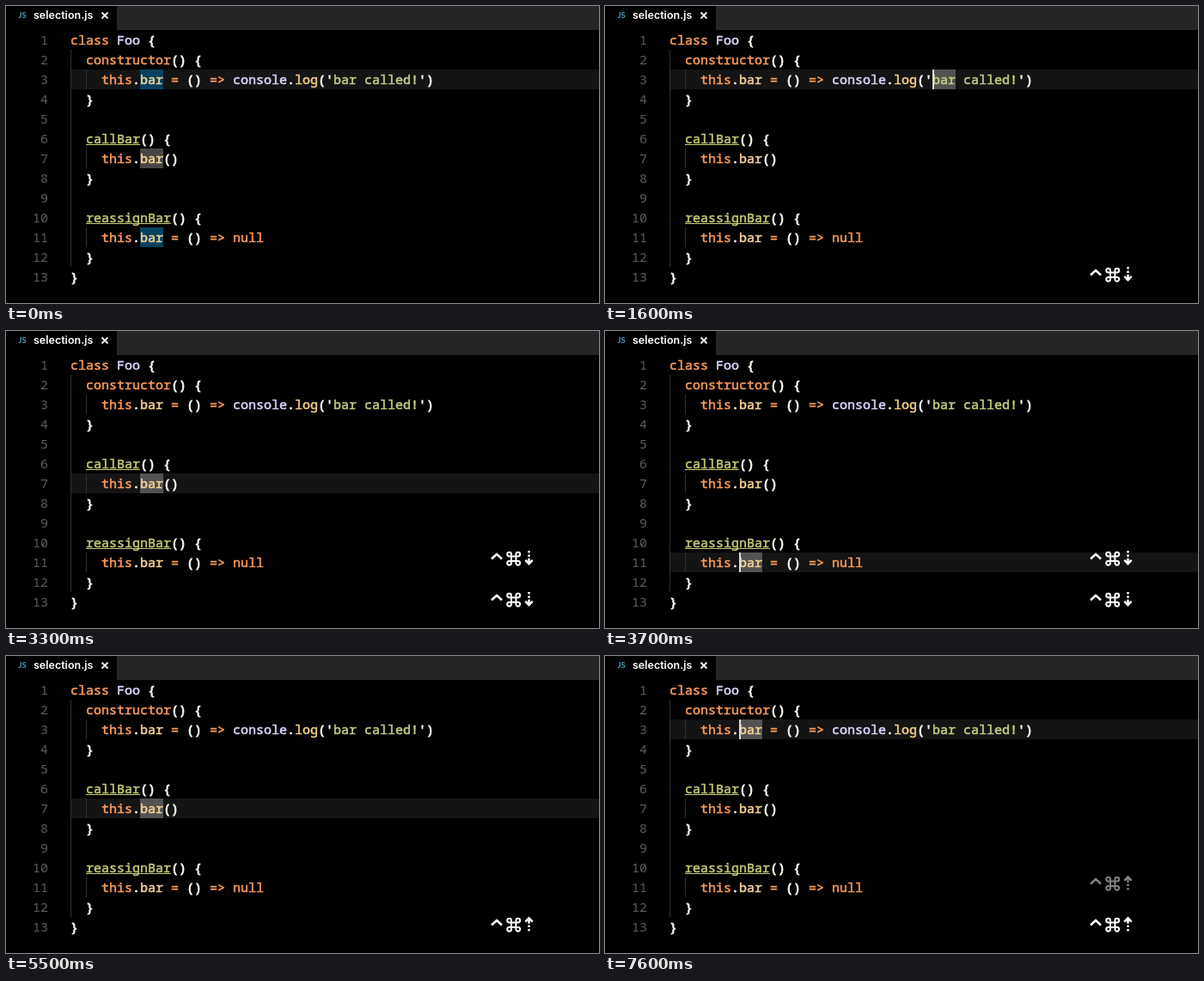
Recreate the animation shown at these times as an HTML page. Size 690 px wide and 346 px high, loop 7700 ms.

```html
<!DOCTYPE html>
<html lang="en">
<head>
<meta charset="utf-8">
<title>Selecting occurrences</title>
<style>
  html, body { margin: 0; width: 100%; height: 100%; overflow: hidden; background: #000; }
  svg { display: block; width: 690px; height: 346px; }
  .code text { font: 500 15px "Noto Sans Mono", "DejaVu Sans Mono", monospace; white-space: pre; stroke-width: .55; }
  .code .p { stroke-width: .8; }
  .tab { font: 600 12.5px Inter, Roboto, sans-serif; fill: #fff; }
  .icon { font: 700 9.5px Lato, "Open Sans", sans-serif; fill: #4d9cbd; }
  .num { fill: #5c5c5c; text-anchor: end; }
  .key { fill: none; stroke: #fff; stroke-width: 2; }
</style>
</head>
<body>
<svg id="stage" viewBox="0 0 690 346">
  <rect width="690" height="346" fill="#000"/>
  <rect x="129" width="561" height="28" fill="#252526"/>
  <text class="icon" x="14.5" y="14">JS</text>
  <text class="tab" x="32" y="15">selection.js</text>
  <path d="M111.5 7.5l7 7m0-7l-7 7" stroke="#eee" stroke-width="1.8"/>
  <rect id="row" x="75" width="615" height="23" fill="#141414"/>
  <g id="marks"></g>
  <rect id="selection" width="27" height="23" fill="#525252"/>
  <g id="guides" fill="#303030"></g>
  <g id="code" class="code"></g>
  <rect id="caret" width="2" height="23" fill="#dedede"/>
  <g id="keys"></g>
</svg>
<script>
const LOOP = 7700, STEP = 100, COL = 9, ROW = 23, LEFT = 75, TOP = 28;
const LINGER = 1800, FADE = 200, KEY_GAP = 48;

// k keyword, n name, p punctuation, f call, m method, s string, v property
const COLORS = {
  k: '#f99a58', n: '#d9d6fc', p: '#fafaf5', f: '#f5cf86',
  m: '#c3c974', s: '#c3ce84', v: '#f7d498'
};
const LINES = [
  [0, 'k:class ', 'n:Foo ', 'p:{'],
  [2, 'k:constructor', 'p:() {'],
  [4, 'k:this', 'p:.', 'v:bar', 'k: = ', 'p:() ', 'k:=> ', 'n:console', 'p:.', 'f:log', "p:('", 's:bar called!', "p:')"],
  [2, 'p:}'],
  [0],
  [2, 'm:callBar', 'p:() {'],
  [4, 'k:this', 'p:.', 'v:bar', 'p:()'],
  [2, 'p:}'],
  [0],
  [2, 'm:reassignBar', 'p:() {'],
  [4, 'k:this', 'p:.', 'v:bar', 'k: = ', 'p:() ', 'k:=> ', 'k:null'],
  [2, 'p:}'],
  [0, 'p:}']
];
const MOVES = [
  { at: 1500, row: 2, col: 34, down: true },
  { at: 2500, row: 6, col: 9, down: true },
  { at: 3500, row: 10, col: 9, down: true },
  { at: 4900, row: 6, col: 9, down: false },
  { at: 5700, row: 2, col: 34, down: false },
  { at: 6600, row: 2, col: 9, down: false }
];
const START = { at: -500, row: 2, col: 9 };

const $ = id => document.getElementById(id);
const colX = col => LEFT + col * COL;
const rowY = row => TOP + row * ROW;

function add(parent, tag, attrs, text) {
  const el = document.createElementNS('http://www.w3.org/2000/svg', tag);
  set(el, attrs);
  if (text !== undefined) el.textContent = text;
  parent.appendChild(el);
  return el;
}

function set(el, attrs) {
  for (const name in attrs) el.setAttribute(name, attrs[name]);
}

function addLine([indent, ...tokens], row) {
  const code = $('code'), y = rowY(row) + 17;
  add(code, 'text', { class: 'num', x: 49, y }, row + 1);
  let col = indent;
  for (const token of tokens) {
    const kind = token[0], text = token.slice(2), x = colX(col), color = COLORS[kind];
    add(code, 'text', { class: kind, x, y, fill: color, stroke: color }, text);
    if (kind === 'm') {
      add(code, 'rect', { x, y: y + 1, width: text.length * COL, height: 1, fill: color });
    }
    col += text.length;
  }
}

function addKey({ down }) {
  const key = add($('keys'), 'g', { class: 'key' });
  add(key, 'path', { d: 'M565 313.5l6-5.5l6 5.5', 'stroke-width': 2.5 });
  // four loops around a square
  add(key, 'path', {
    d: 'M588 310.5h5.4v5.4h-5.4zM588 310.5h-2.4a2.4 2.4 0 1 1 2.4-2.4zM593.4 310.5v-2.4a2.4 2.4 0 1 1 2.4 2.4z' +
       'M593.4 315.9h2.4a2.4 2.4 0 1 1-2.4 2.4zM588 315.9v2.4a2.4 2.4 0 1 1-2.4-2.4z'
  });
  add(key, 'path', {
    d: 'M608.5 304v2.6m0 1.8v2.6m0 1.8v6M604.3 314.8l4.2 4.4l4.2-4.4',
    'stroke-width': 2.4,
    transform: down ? '' : 'matrix(1 0 0 -1 0 624.5)'
  });
  return key;
}

LINES.forEach(addLine);
add($('guides'), 'rect', { x: LEFT, y: rowY(1), width: 1, height: 11 * ROW });
for (const row of [2, 6, 10]) {
  add($('guides'), 'rect', { x: colX(2), y: rowY(row), width: 1, height: ROW });
  add($('marks'), 'rect', {
    x: colX(9), y: rowY(row), width: 3 * COL, height: ROW, fill: row === 6 ? '#484644' : '#06425f'
  });
}
const keys = MOVES.map(addKey);

function draw(time) {
  const t = Math.floor(time % LOOP / STEP) * STEP;
  const past = MOVES.filter(move => move.at <= t);
  const now = past[past.length - 1] || START;
  const x = colX(now.col), y = rowY(now.row);
  const moved = past.length > 0;

  set($('row'), { y });
  set($('marks'), { visibility: moved ? 'hidden' : 'visible' });
  set($('selection'), { x, y, visibility: moved ? 'visible' : 'hidden' });
  set($('caret'), { x, y, visibility: (t - now.at) % 1000 < 500 ? 'visible' : 'hidden' });

  keys.forEach((key, i) => {
    const age = t - MOVES[i].at;
    const opacity = age < 0 ? 0 : Math.max(0, Math.min(1, (LINGER + FADE - age) / FADE));
    const lift = Math.max(0, past.length - 1 - i) * KEY_GAP;
    set(key, { opacity, transform: `translate(0 ${-lift})` });
  });
}

const begin = performance.now();
function tick() {
  draw(performance.now() - begin);
  requestAnimationFrame(tick);
}
tick();
</script>
</body>
</html>
```
